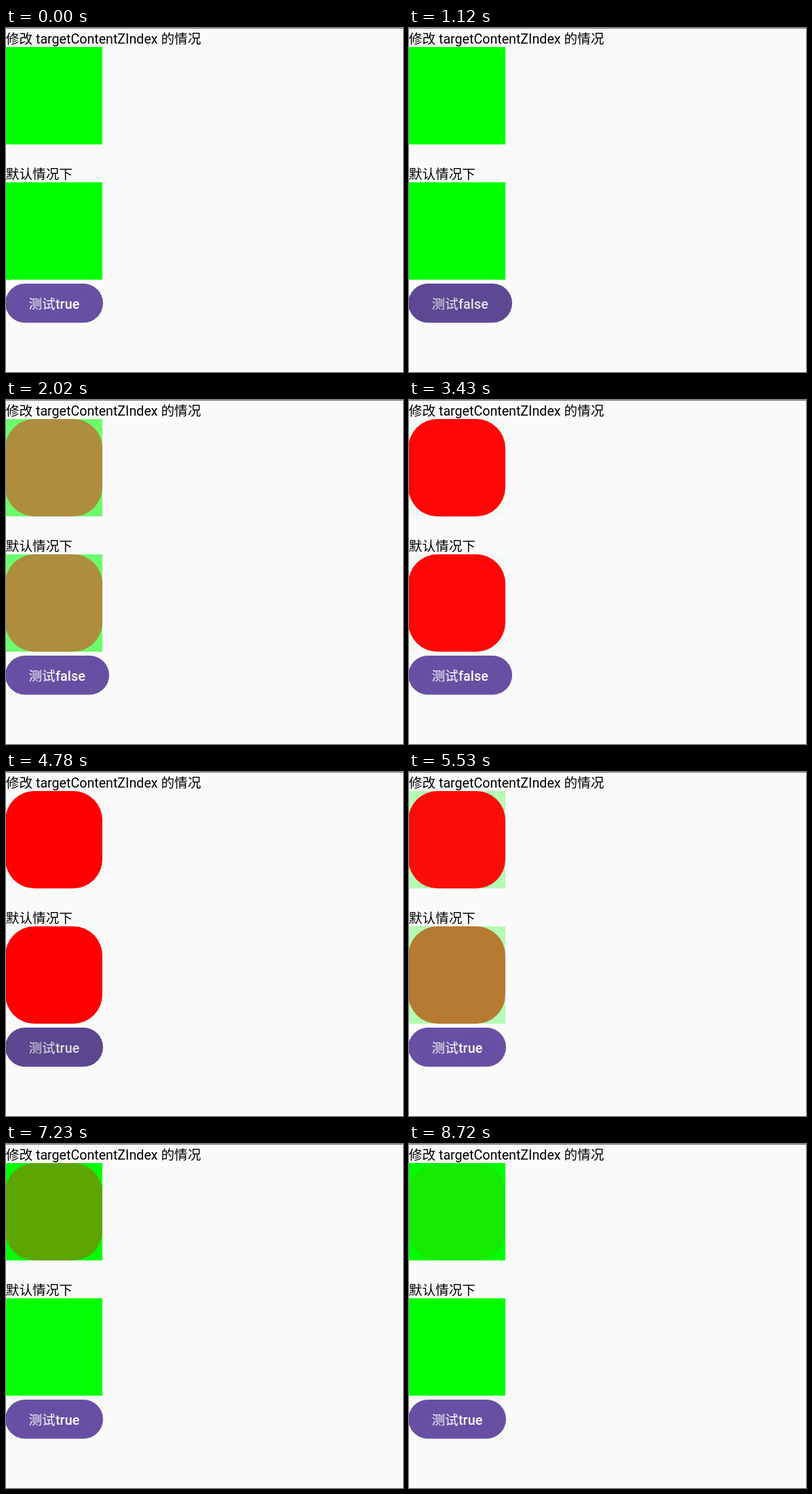
Animation, 585 px wide and 506 px high, one loop 8.77 s. Source, as an HTML page with a canvas:

```html
<!DOCTYPE html>
<html lang="zh">
<head>
<meta charset="utf-8">
<style>
html, body { margin: 0; width: 100%; height: 100%; overflow: hidden; background: #fafafa; }
canvas { display: block; }
</style>
</head>
<body>
<canvas id="stage" width="585" height="506"></canvas>
<script>
const ctx = document.getElementById('stage').getContext('2d');
const LOOP = 8770;
const TO_RED = 1041, TO_GREEN = 4727;
const FONT = '19.65px Roboto, "Noto Sans CJK SC", "Noto Sans CJK", sans-serif';

const clamp = v => Math.min(1, Math.max(0, v));
const mix = (a, b, k) => a + (b - a) * k;

// cubic-bezier(.4, 0, .2, 1)
function ease(v) {
  const x = clamp(v);
  if (x === 0 || x === 1) return x;
  let lo = 0, hi = 1;
  for (let i = 0; i < 24; i++) {
    const s = (lo + hi) / 2, r = 1 - s;
    if (1.2 * s * r * r + 0.6 * s * s * r + s * s * s < x) lo = s; else hi = s;
  }
  return lo * lo * (3 - 2 * lo);
}

function box(x, y, w, h, r, color, alpha = 1) {
  ctx.globalAlpha = alpha;
  ctx.fillStyle = color;
  ctx.beginPath();
  ctx.roundRect(x, y, w, h, r);
  ctx.fill();
  ctx.globalAlpha = 1;
}

function label(text, x, y, color = '#000', weight = 400) {
  ctx.font = weight + ' ' + FONT;
  ctx.fillStyle = color;
  ctx.fillText(text, x, y);
}

function drawCard(y, t, redOnTop, fadeOut) {
  const back = t >= TO_GREEN;
  const p = ease((t - TO_RED) / 3000);
  const green = back ? ease((t - TO_GREEN) / 3000) : 1 - p;
  const red = back ? 1 - ease((t - TO_GREEN) / fadeOut) : p;
  const layers = [
    () => box(-1, y, 143, 143.2, 0, '#0f0', green),
    () => box(-1, y, 143, 143.2, 42.9, '#f00', red)
  ];
  if (back && !redOnTop) layers.reverse();
  layers.forEach(draw => draw());
}

function drawButton(t) {
  const on = t < TO_RED || t >= TO_GREEN;
  const w = on ? 144 : 153;
  box(-1, 376, w, 57.5, 28.75, '#6750a4');
  label('测试', 33.4, 413, '#fff');
  ctx.letterSpacing = '0.14px';
  label(on ? 'true' : 'false', 72.9, 413, '#fff', 500);
  ctx.letterSpacing = '0px';

  // Ripple around the last click
  const age = t - (on ? TO_GREEN : TO_RED);
  if (t < TO_RED || age > 204) return;
  ctx.save();
  ctx.beginPath();
  ctx.roundRect(-1, 376, w, 57.5, 28.75);
  ctx.clip();
  ctx.globalAlpha = 0.12 * (1 - clamp((age - 54) / 150));
  ctx.fillStyle = '#000';
  ctx.beginPath();
  ctx.arc(115, 407, mix(90, 125, clamp(age / 50)), 0, Math.PI * 2);
  ctx.fill();
  ctx.restore();
}

// The pointer rises to the button and leaves after the click
function drawPointer(t, from, travel, click) {
  if (t < from || t >= click) return;
  const s = clamp((t - from) / travel);
  const k = s * (2 - s);
  ctx.save();
  ctx.translate(mix(146, 116, k), mix(496, 409, k));
  ctx.beginPath();
  ctx.moveTo(0, 0);
  ctx.lineTo(0, 29);
  ctx.lineTo(7, 22);
  ctx.lineTo(20, 20.5);
  ctx.closePath();
  ctx.moveTo(7, 20);
  ctx.lineTo(13, 33);
  ctx.lineJoin = 'round';
  ctx.lineWidth = 4;
  ctx.strokeStyle = '#fff';
  ctx.stroke();
  ctx.lineWidth = 2;
  ctx.strokeStyle = '#000';
  ctx.stroke();
  ctx.fillStyle = '#000';
  ctx.fill();
  ctx.restore();
}

function draw(t) {
  ctx.fillStyle = '#fafafa';
  ctx.fillRect(0, 0, 585, 506);
  ctx.fillStyle = '#777';
  ctx.fillRect(0, 0, 585, 1);
  label('修改 targetContentZIndex 的情况', -0.2, 23);
  drawCard(28, t, true, 6000);
  label('默认情况下', -0.2, 222);
  drawCard(227, t, false, 3000);
  drawButton(t);
  drawPointer(t, 340, 470, TO_RED);
  drawPointer(t, 3620, 410, TO_GREEN);
}

const start = performance.now();
function tick() {
  draw((performance.now() - start) % LOOP);
  requestAnimationFrame(tick);
}
tick();
</script>
</body>
</html>
```
